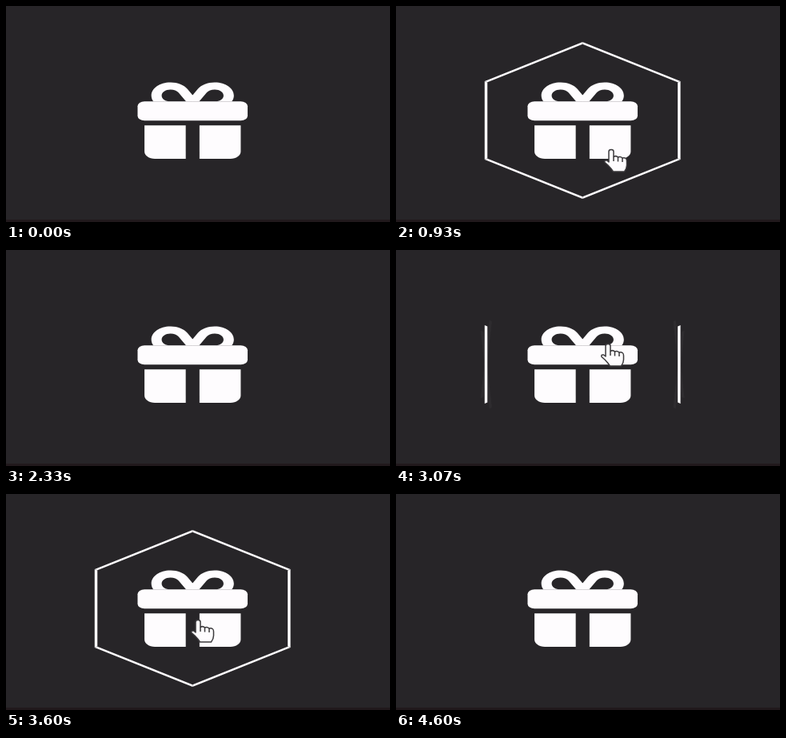
An HTML page with a canvas that plays this animation: 480 px wide and 270 px high, repeating every 4870 ms.

```html
<!DOCTYPE html>
<html lang="en">
<head>
<meta charset="utf-8">
<title>Gift button</title>
<style>
  html, body { margin: 0; width: 100%; height: 100%; overflow: hidden; background: #272528; }
  canvas { display: block; width: 480px; height: 270px; }
</style>
</head>
<body>
<canvas id="stage" width="480" height="270"></canvas>
<script>
const ctx = document.getElementById('stage').getContext('2d');
const LOOP = 4870, STEP = 1000 / 15;
const BG = '#272528', WHITE = '#fefcfe';
const CENTER = { x: 233.2, y: 143 }, STRETCH = 1.44;

const bow = new Path2D('M73.6 128C67.5 116 64 102.4 64 88C64 39.4 103.4 0 152 0h2.2' +
  'C186.1 0 215.7 16.9 231.9 44.4L256 85.5H257V128Z' +
  'M190.5 68.8L225.3 128H152c-22.1 0-40-17.9-40-40s17.9-40 40-40h2.2c14.9 0 28.8 7.9 36.3 20.8z');
const box = new Path2D('M32 288V464c0 26.5 21.5 48 48 48H224V288Z');
const edge = new Path2D('M85 -49V49L82.6 47.6V-47.6Z');
const hand = new Path2D('M-3 2Q-3 -.5 0 -.5Q3 -.5 3 2V8.5Q6 6.5 8.5 9Q11.5 7.5 14 10Q19.5 9 19.5 14V19' +
  'Q19.5 23 16.5 27H2.5Q0 23 -4 19L-8 15.5Q-9 12.5 -5.5 13L-3 15Z');
const creases = new Path2D('M3 8.5V14M8.5 9V14.5M14 10V15');
const arrow = new Path2D('M0 0V19L5 15L9 22L12 20.5L8.5 14H15Z');

// Each visit of the pointer: hover on, hover off.
const hovers = [
  { on: 300, off: 1815 },
  { on: 2985, off: 4085 }
];
const OPEN = 600, CLOSE = 500, TURN = 120;

// Pointer stops: time, x, y, shape; held until the next stop.
const stops = [
  [267, 392, 204, arrow], [333, 300, 189, hand], [400, 275, 182, hand],
  [467, 269, 180, hand], [1800, 272, 162, hand], [1867],
  [2933, 464, 84, arrow], [3000, 310, 104, hand], [3067, 265, 118, hand],
  [3133, 252, 138, hand], [3200, 243, 153, hand], [3267, 240, 158, hand],
  [4067, 262, 156, hand], [4133, 447, 150, arrow], [4200]
];

const clamp = v => Math.min(1, Math.max(0, v));

// cubic-bezier(.42, 0, .58, 1)
function easeInOut(x) {
  if (x <= 0 || x >= 1) return clamp(x);
  let lo = 0, hi = 1, u = x;
  for (let i = 0; i < 20; i++) {
    u = (lo + hi) / 2;
    const bx = 1.26 * u * (1 - u) ** 2 + 1.74 * u * u * (1 - u) + u ** 3;
    if (bx < x) lo = u; else hi = u;
  }
  return u * u * (3 - 2 * u);
}

function drawGift() {
  ctx.save();
  ctx.translate(164.5, 95.5);
  ctx.scale(0.2686, 0.1865);
  ctx.fillStyle = WHITE;
  for (const side of [1, -1]) {
    ctx.save();
    if (side < 0) { ctx.translate(512, 0); ctx.scale(-1, 1); }
    ctx.fill(bow, 'evenodd');
    ctx.fill(box);
    ctx.restore();
  }
  ctx.beginPath();
  ctx.roundRect(0, 128, 512, 128, 32);
  ctx.fill();
  ctx.restore();
}

function drawEdges(degrees, alpha) {
  if (alpha <= 0) return;
  ctx.save();
  ctx.globalAlpha = alpha;
  ctx.fillStyle = WHITE;
  ctx.translate(CENTER.x, CENTER.y);
  ctx.scale(STRETCH, 1);
  ctx.rotate(degrees * Math.PI / 180);
  ctx.fill(edge);
  ctx.rotate(Math.PI);
  ctx.fill(edge);
  ctx.restore();
}

function drawHexagon(t) {
  for (const { on, off } of hovers) {
    if (t < on || t > off + CLOSE) continue;
    const inside = t < off;
    const p = inside ? easeInOut((t - on) / OPEN) : 1 - easeInOut((t - off) / CLOSE);
    drawEdges(TURN * p, p);
    drawEdges(-TURN * p, p);
    if (inside) drawEdges(0, 1);
  }
}

function drawPointer(t) {
  const stop = stops.filter(s => s[0] <= t + 2).pop();
  if (!stop || !stop[3]) return;
  const [, x, y, shape] = stop;
  ctx.save();
  ctx.translate(x, y);
  ctx.fillStyle = WHITE;
  ctx.strokeStyle = '#3c3a3d';
  ctx.lineWidth = 1.5;
  ctx.lineJoin = 'round';
  ctx.fill(shape);
  ctx.stroke(shape);
  if (shape === hand) ctx.stroke(creases);
  ctx.restore();
}

function draw(now) {
  const t = Math.floor((now % LOOP + 4) / STEP) * STEP;
  ctx.filter = 'none';
  ctx.fillStyle = BG;
  ctx.fillRect(0, 0, 480, 270);
  ctx.fillStyle = '#21191c';
  ctx.fillRect(0, 267, 480, 3);
  ctx.filter = 'blur(0.45px)';
  drawHexagon(t);
  drawGift();
  drawPointer(t);
}

const start = performance.now();
function tick() {
  draw(performance.now() - start);
  requestAnimationFrame(tick);
}
tick();
</script>
</body>
</html>
```
